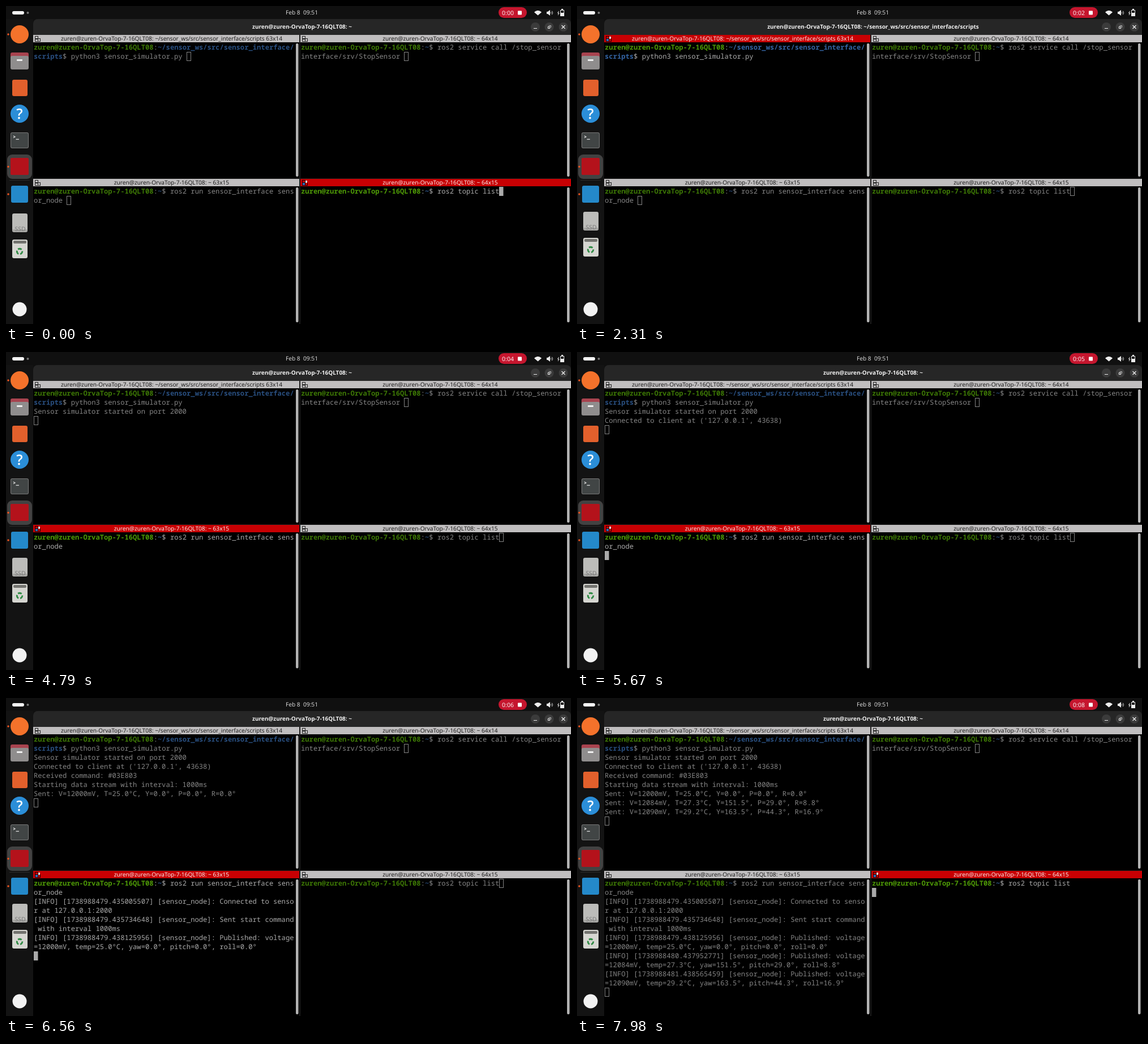
Recreate the animation shown at these times as an HTML page with a canvas. Size 998 by 561 pixels, loop 8 s.

```html
<!DOCTYPE html>
<html lang="en">
<head>
<meta charset="utf-8">
<title>Sensor terminals</title>
<style>
html, body { margin: 0; width: 100%; height: 100%; overflow: hidden; background: #000; }
canvas { display: block; }
</style>
</head>
<body>
<canvas id="stage" width="998" height="561"></canvas>
<script>
const ctx = document.getElementById('stage').getContext('2d');
const LOOP = 8000, CELL_W = 7.3, CELL_H = 16;
const UI = '"Open Sans", "Noto Sans", sans-serif';
const MONO = '12.17px "Noto Sans Mono", "DejaVu Sans Mono", monospace';
const HOST = 'zuren@zuren-OrvaTop-7-16QLT08';
const DIR = '~/sensor_ws/src/sensor_interface/scripts';

// Style marks inside terminal text: « green, ‹ blue, » plain
const STYLES = { '«': ['bold ', '#4e9a06'], '‹': ['bold ', '#3465a4'], '»': ['', '#aaaaaa'] };
const PROMPT = `«${HOST}»:‹~»$ `;
const info = (stamp, text) => `[INFO] [1738988${stamp}] [sensor_node]: ${text}\n`;

// Each log entry is [time, text added]; the cursor stands after the last one
const panes = [
  { x: 48, y: 51, w: 470, h: 253, title: `${HOST}: ${DIR} 63x14`, log: [
    [0, `«${HOST}»:‹~/sensor_ws/src/sensor_interface/\nscripts»$ python3 sensor_simulator.py `],
    [2490, '\n'],
    [2660, 'Sensor simulator started on port 2000\n'],
    [5670, "Connected to client at ('127.0.0.1', 43638)\n"],
    [5850, 'Received command: #03E803\nStarting data stream with interval: 1000ms\n' +
           'Sent: V=12000mV, T=25.0°C, Y=0.0°, P=0.0°, R=0.0°\n'],
    [6740, 'Sent: V=12084mV, T=27.3°C, Y=151.5°, P=29.0°, R=8.8°\n'],
    [7800, 'Sent: V=12090mV, T=29.2°C, Y=163.5°, P=44.3°, R=16.9°\n']] },
  { x: 520, y: 51, w: 478, h: 253, title: `${HOST}: ~ 64x14`, log: [
    [0, PROMPT + 'ros2 service call /stop_sensor\ninterface/srv/StopSensor ']] },
  { x: 48, y: 305, w: 470, h: 256, title: `${HOST}: ~ 63x15`, log: [
    [0, PROMPT + 'ros2 run sensor_interface sens\nor_node '],
    [5320, '\n'],
    [5850, info('479.435005507', 'Connected to senso\nr at 127.0.0.1:2000') +
           info('479.435734648', 'Sent start command\n with interval 1000ms') +
           info('479.438125956', 'Published: voltage\n=12000mV, temp=25.0°C, yaw=0.0°, pitch=0.0°, roll=0.0°')],
    [6740, info('480.437952771', 'Published: voltage\n=12084mV, temp=27.3°C, yaw=151.5°, pitch=29.0°, roll=8.8°')],
    [7800, info('481.438565459', 'Published: voltage\n=12090mV, temp=29.2°C, yaw=163.5°, pitch=44.3°, roll=16.9°')]] },
  { x: 520, y: 305, w: 478, h: 256, title: `${HOST}: ~ 64x15`, log: [
    [0, PROMPT + 'ros2 topic list'],
    [7800, '\n']] }
];

const focusTimes = [[0, 3], [710, 0], [4260, 2], [7090, 3]];
const cursorOff = [[180, 710], [1060, 1770], [2310, 2490], [3190, 3720],
                   [4790, 5140], [6030, 6560], [7620, 7800]];
const ticks = [1060, 1950, 3010, 3900, 4970, 6030, 6910, 7980];

function rect(x, y, w, h, fill, r = 0) {
  ctx.fillStyle = fill;
  ctx.beginPath();
  ctx.roundRect(x, y, w, h, r);
  ctx.fill();
}

function disc(x, y, r, fill) {
  ctx.fillStyle = fill;
  ctx.beginPath();
  ctx.arc(x, y, r, 0, 7);
  ctx.fill();
}

function line(points, color, width = 1) {
  ctx.strokeStyle = color;
  ctx.lineWidth = width;
  ctx.beginPath();
  points.forEach(([x, y]) => ctx.lineTo(x, y));
  ctx.stroke();
}

function frame(x, y, w, h, color) {
  ctx.strokeStyle = color;
  ctx.lineWidth = 1;
  ctx.strokeRect(x + .5, y + .5, w - 1, h - 1);
}

function label(text, x, y, font, color, align = 'center') {
  ctx.font = font;
  ctx.fillStyle = color;
  ctx.textAlign = align;
  ctx.fillText(text, x, y);
}

function drawTopBar(seconds) {
  rect(0, 0, 998, 23, '#101010');
  rect(11, 9, 21, 6, '#f4f4f4', 3);
  disc(38.5, 12, 2, '#777');
  label('Feb 8  09:51', 522.5, 15, `500 10.2px ${UI}`, '#e4e4e4');
  rect(870, 2, 50, 19, '#c5162e', 9.5);
  label('0:0' + seconds, 886.5, 15.5, `10.5px ${UI}`, '#fff');
  rect(904, 8.5, 7, 7, '#fff', 1);

  // Wireless, speaker, battery
  ctx.fillStyle = '#eee';
  ctx.beginPath();
  ctx.moveTo(939.5, 16.5);
  ctx.arc(939.5, 16.5, 8.5, -Math.PI * .78, -Math.PI * .22);
  ctx.fill();
  rect(955, 10, 3, 4, '#eee');
  ctx.beginPath();
  [[957, 10], [961, 7], [961, 17], [957, 14]].forEach(([x, y]) => ctx.lineTo(x, y));
  ctx.fill();
  for (const r of [2, 4.5]) {
    ctx.strokeStyle = '#ddd';
    ctx.beginPath();
    ctx.arc(961, 12, r, -.8, .8);
    ctx.stroke();
  }
  frame(979, 7, 7, 11, '#eee');
  rect(981, 5, 3, 2, '#eee');
  rect(980, 12, 5, 5, '#eee');
  line([[976.5, 9], [974.5, 12.5], [977, 12.5], [975, 16]], '#eee');
}

function drawHeader(title) {
  rect(48, 23, 950, 28, '#262626', [8, 8, 0, 0]);
  label(title, 523, 40, `bold 10px ${UI}`, '#f2f2f2');
  for (const x of [935, 959.5, 984.5]) disc(x, 37, 8, '#3b3b3b');
  line([[932, 39.5], [938, 39.5]], '#eee');
  frame(957, 36, 4, 4, '#eee');
  line([[958.5, 34.5], [962.5, 34.5], [962.5, 38]], '#bbb');
  line([[981.5, 34], [987.5, 40]], '#eee', 1.2);
  line([[987.5, 34], [981.5, 40]], '#eee', 1.2);
}

function drawDock(shift) {
  rect(0, 23, 48, 538, '#131313');
  disc(24, 50, 16, '#f4722b');

  // Folder
  rect(8, 82, 32, 20, '#a8434f', 3);
  rect(8, 88, 32, 24, '#8f8d8d', 3);
  rect(19, 94, 10, 3, '#f0f0f0', 1);

  rect(11, 130, 27, 29, '#e2602c', 3);

  disc(24, 190, 16, '#2b8ed8');
  label('?', 24, 199, `600 25px ${UI}`, '#fff');

  rect(8, 223, 32, 28, '#787878', 3);
  rect(9, 224, 30, 26, '#414545', 2);
  label('>_', 12, 234, 'bold 9px "Noto Sans Mono", monospace', '#fff', 'left');

  rect(2, 262, 44, 43, '#424242', 9);
  rect(8, 268, 32, 30, '#b4121b', 2);
  rect(6, 307, 36, 1, '#2c2c2c');

  rect(9, 317, 30, 30, '#2489ca', 3);

  // Drive
  rect(11, 363 + shift, 27, 33, '#bcbcb9', 3);
  rect(11, 391 + shift, 27, 4, '#a5a5a2', 2);
  label('SSD', 25, 393.5 + shift, `10.5px ${UI}`, '#777');

  // Bin
  rect(11, 409 + shift, 27, 33, '#d6d6d1', 3);
  rect(13, 411 + shift, 23, 5, '#73736f', 2);
  ctx.strokeStyle = '#2f8b44';
  ctx.lineWidth = 3;
  for (let i = 0; i < 3; i++) {
    const a = i * Math.PI * 2 / 3 - 2.2;
    ctx.beginPath();
    ctx.arc(24, 430 + shift, 4.7, a, a + 1.45);
    ctx.stroke();
  }

  disc(24, 535, 12.5, '#f2f2f2');
  for (const y of [50, 283.5, 332]) disc(4, y, 1.8, '#e95420');
}

function drawCursor(x, y, focused, visible) {
  if (!focused) frame(x, y, 8, 16, '#aaa');
  else if (visible) rect(x, y, 7.5, 16, '#aaa');
}

function drawPane(p, t, focused, visible) {
  rect(p.x, p.y, p.w, p.h, '#000');
  rect(p.x, p.y, p.w, 13, focused ? '#c80003' : '#c0bebf');
  label(p.title, p.x < 500 ? 292.5 : 767, p.y + 10, `10.2px ${UI}`, focused ? '#fff' : '#111');

  // Group icon
  const ix = p.x + 3, iy = p.y + 2, ink = focused ? '#240000' : '#222';
  frame(ix, iy, 6, 6, ink);
  frame(ix, iy + 4, 6, 6, ink);
  frame(ix + 5, iy + 4, 5, 6, ink);
  if (focused) {
    rect(ix + 1, iy + 5, 4, 4, '#3268b4');
    rect(ix + 6, iy + 1, 3, 4, '#ddd');
  }

  // Text
  ctx.save();
  ctx.globalAlpha = focused ? 1 : .78;
  const top = p.y + 14;
  let col = 0, row = 0, style = STYLES['»'];
  const text = p.log.filter(([start]) => t >= start).map(entry => entry[1]).join('');
  for (const part of text.split(/([\n«‹»])/)) {
    if (part === '\n') { row++; col = 0; }
    else if (STYLES[part]) style = STYLES[part];
    else if (part) {
      label(part, p.x + 1 + col * CELL_W, top + row * CELL_H + 12, style[0] + MONO, style[1], 'left');
      col += part.length;
    }
  }
  drawCursor(Math.round(p.x + .5 + col * CELL_W), top + row * CELL_H, focused, visible);
  ctx.restore();

  rect(p.x + p.w - (p.x < 500 ? 6 : 7), p.y + 15, 4.5, p.h - 18, '#b4b4b4', 2);
}

function draw(now) {
  const t = now % LOOP;
  const focus = focusTimes.filter(([start]) => t >= start).pop()[1];
  const visible = !cursorOff.some(([a, b]) => t >= a && t < b);
  ctx.textRendering = 'geometricPrecision';
  rect(0, 0, 998, 561, '#101010');
  drawTopBar(ticks.filter(tick => t >= tick).length);
  drawDock(t < 180 ? 3 : 0);
  drawHeader(`${HOST}: ${focus === 0 ? DIR : '~'}`);
  rect(48, 51, 950, 510, '#1c1c1c');
  panes.forEach((p, i) => drawPane(p, t, i === focus, visible));
  requestAnimationFrame(draw);
}
requestAnimationFrame(draw);
</script>
</body>
</html>
```
